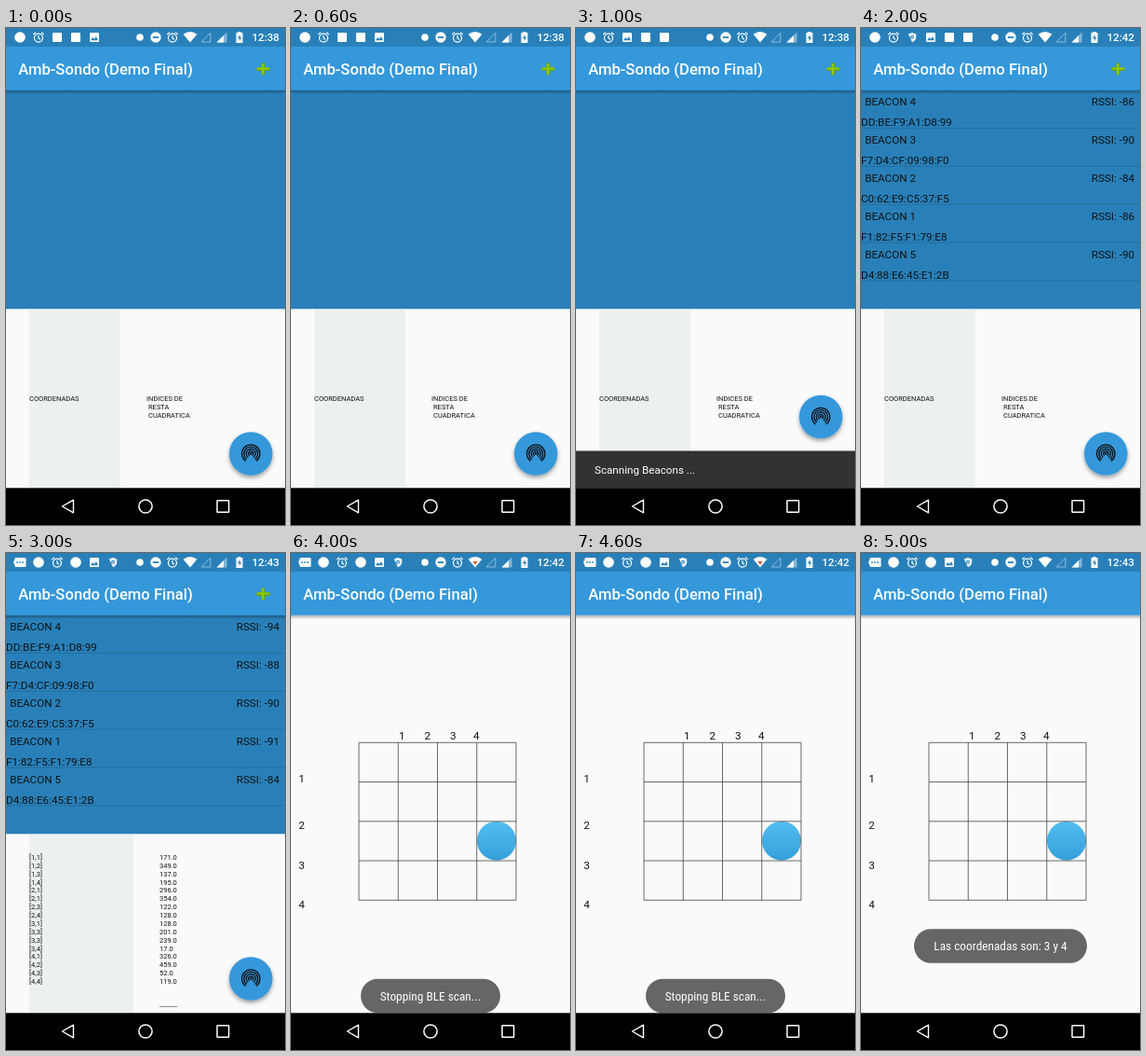
These frames come from a looping animation (300x533 px, 6 s). An HTML page:

```html
<!DOCTYPE html>
<html lang="es">
<head>
<meta charset="utf-8">
<title>Beacon demo</title>
<style>
  html, body { margin: 0; width: 100%; height: 100%; overflow: hidden; background: #fafafa; }
  svg { display: block; width: 100vw; height: 100vh; font-family: Roboto, sans-serif; }
  text { white-space: pre; }
  .toast { font-family: "Roboto Condensed", Roboto, sans-serif; font-stretch: 75%; }
</style>
</head>
<body>
<svg id="stage" viewBox="0 0 300 533">
  <defs>
    <linearGradient id="shade" x2="0" y2="1">
      <stop stop-color="#000" stop-opacity=".32"/>
      <stop offset="1" stop-color="#000" stop-opacity="0"/>
    </linearGradient>
    <linearGradient id="ball" x2="0" y2="1">
      <stop stop-color="#52bdf0"/>
      <stop offset="1" stop-color="#359fdb"/>
    </linearGradient>
    <filter id="drop" x="-30%" y="-30%" width="160%" height="170%">
      <feDropShadow dx="0" dy="2.5" stdDeviation="2.2" flood-opacity=".38"/>
    </filter>
  </defs>
  <g id="screen"></g>
</svg>
<script>
const BLUE = '#3498db', DARK = '#2980b9', PAPER = '#fafafa', INK = '#111';
const SIZE = 11.67, SMALL = 7.5, LEAD = 8.87;

const rect = (x, y, w, h, fill, more = '') =>
  `<rect x="${x}" y="${y}" width="${w}" height="${h}" fill="${fill}" ${more}/>`;
const disc = (x, y, r, fill, more = '') =>
  `<circle cx="${x}" cy="${y}" r="${r}" fill="${fill}" ${more}/>`;
const path = (d, fill, more = '') => `<path d="${d}" fill="${fill}" ${more}/>`;
const line = (d, stroke, w = 1) => path(d, 'none', `stroke="${stroke}" stroke-width="${w}"`);
const label = (x, y, s, size = SIZE, fill = INK, more = '') =>
  `<text x="${x}" y="${y}" font-size="${size}" fill="${fill}" ${more}>${s}</text>`;
const at = (x, y, body) => `<g transform="translate(${x} ${y})">${body}</g>`;

// Status icons, centred on the origin
const icons = {
  dot: disc(0, 0, 5.8, '#fff'),
  square: rect(-5, -5, 10, 10, '#fff', 'rx="1"'),
  alarm: disc(0, .6, 4.5, 'none', 'stroke="#fff" stroke-width="1.2"') +
    line('M0-2V1L2 2.3M-5.7-3L-3-5.4M5.7-3L3-5.4', '#fff', 1.2),
  image: rect(-5, -5, 10, 10, '#fff', 'rx="1.2"') + path('M-4 3.3L-1.6 0L0 2L2-1L4 3.3Z', DARK),
  shield: path('M0-5L4.2-3.4V0Q4 3.5 0 5.2Q-4-3.5-4.2-3.4V0Q-4 3.5 0 5.2Q-4 3.5-4.2 0V-3.4Z', '#fff') +
    disc(0, -.2, 2, DARK) + disc(0, -.2, .9, '#fff'),
  chat: path('M-5-5H5Q6.5-5 6.5-3.5V3.5Q6.5 5 5 5H-5L-7 0Z', '#fff') +
    [-3, 0, 3].map(x => disc(x, 0, .9, DARK)).join(''),
  quiet: disc(0, 0, 5.7, '#fff') + rect(-3.2, -.9, 6.4, 1.8, DARK),
  wifi: path('M0 5.6L-7.4-3.2Q0-8.6 7.4-3.2Z', '#fff'),
  wifiOff: path('M0 5.6L-7.4-3.2Q0-8.6 7.4-3.2Z', '#fff') + path('M-2.6-1H2.6L0 2.6Z', '#d9532c'),
  empty: path('M-4.8 5H4.8V-4.8Z', 'none', 'stroke="#8bbbdc" stroke-width="1"'),
  signal: path('M-5.5 5.5H5.5V-5.5Z', '#83b5d8') + path('M-5.5 5.5H2V-2Z', '#fff'),
  battery: path('M-1.5-6H1.5V-5H3.5V6H-3.5V-5H-1.5Z', '#fff') +
    path('M.8-3L-2 1H-.2V4L2.2 0H.5Z', DARK)
};

function statusBar(time, left, wifi = 'wifi') {
  const put = (name, x) => at(x, 10, icons[name]);
  return rect(0, 0, 300, 20, DARK) +
    left.split(' ').map((name, i) => put(name, 15 + i * 20)).join('') +
    disc(144, 10, 3.8, '#fff') +
    put('quiet', 161) + put('alarm', 179) + put(wifi, 198) +
    put('empty', 215) + put('signal', 232) + put('battery', 251) +
    label(294, 14.3, time, SIZE, '#fff', 'font-weight="500" text-anchor="end"');
}

const plus = path('M274.5 37.5H278.5V42H283.5V46H278.5V50.5H274.5V46H269.5V42H274.5Z', '#6f9f16') +
  path('M275 38H277.4V42.5H283V44.6H277.4V50H275V44.6H270V42.5H275Z', '#8ccb0c');

const toolbar = add => rect(0, 66.6, 300, 4.5, 'url(#shade)') + rect(0, 20, 300, 46.7, BLUE) +
  label(13.3, 50, 'Amb-Sondo (Demo Final)', 16.67, '#fff', 'font-weight="500"') + (add ? plus : '');

const navBar = rect(0, 493.3, 300, 40, '#000') +
  path('M60.5 513L72.5 506.2V519.8Z', 'none', 'stroke="#fff" stroke-width="1.4" stroke-linejoin="round"') +
  disc(150, 513, 7.1, 'none', 'stroke="#fff" stroke-width="1.5"') +
  rect(227, 506.7, 12.6, 12.6, 'none', 'stroke="#fff" stroke-width="1.5" rx=".6"');

// Arc of radius r, open towards the bottom
function arc(r) {
  const a = .62, x = r * Math.sin(a), y = r * Math.cos(a);
  return line(`M${-x} ${y}A${r} ${r} 0 1 1 ${x} ${y}`, INK, 1.35);
}
const fab = y => at(263.3, y, disc(0, 0, 23.3, BLUE, 'filter="url(#drop)"') +
  [2.6, 5, 7.4, 9.7].map(arc).join('') + disc(0, 0, 1.2, INK));

const column = w => rect(25, 302, w, 191.3, '#ecf0f1');
const headings = column(98) + label(25, 400, 'COORDENADAS', SMALL) +
  label(151, 400, 'INDICES DE', SMALL) + label(153, 409, 'RESTA', SMALL) +
  label(153, 417.7, 'CUADRATICA', SMALL);

const cells = '1,1 1,2 1,3 1,4 2,1 2,1 2,3 2,4 3,1 3,3 3,3 3,4 4,1 4,2 4,3 4,4'.split(' ');
const sums = [171, 349, 137, 195, 296, 354, 122, 128, 128, 201, 239, 17, 326, 459, 52, 119];
const results = column(112) + cells.map((c, i) =>
  label(25, 329 + i * LEAD, `[${c}]`, SMALL) +
  label(165, 329 + i * LEAD, sums[i].toFixed(1), SMALL)).join('') +
  rect(165, 486, 19, .8, '#777');

const beacons = [
  [4, 'DD:BE:F9:A1:D8:99'], [3, 'F7:D4:CF:09:98:F0'], [2, 'C0:62:E9:C5:37:F5'],
  [1, 'F1:82:F5:F1:79:E8'], [5, 'D4:88:E6:45:E1:2B']
];
const list = levels => beacons.map(([n, mac], i) => at(0, 66.7 + i * 40.9,
  rect(0, 40.2, 300, .8, '#000', 'opacity=".2"') +
  label(4.2, 16.5, 'BEACON ' + n) + label(294, 16.5, 'RSSI: ' + levels[i], SIZE, INK, 'text-anchor="end"') +
  label(0, 38.6, mac))).join('');

const scanner = (table, rows = '', fabY = 456.5) => rect(0, 66, 300, 235.5, DARK) + rows +
  rect(0, 301.5, 300, 192, PAPER) + table + fab(fabY);

const snackbar = rect(0, 453.5, 300, 40, '#323232') + label(20, 478, 'Scanning Beacons ...', SIZE, '#fff');

function gridPage() {
  const step = 42.25;
  let d = '';
  for (let i = 0; i < 5; i++) d += `M${73 + i * step} 203.3v169M73 ${203.3 + i * step}h169`;
  return rect(0, 66, 300, 428, PAPER) + disc(221, 308.7, 21, 'url(#ball)') + line(d, '#444', .8) +
    [116, 143.5, 171, 196].map((x, i) => label(x, 200, i + 1)).join('') +
    [245.7, 296, 339, 381].map((y, i) => label(8.3, y, i + 1)).join('');
}

const toast = (x, y, w, s) => rect(x, y, w, 36.6, '#666', 'rx="18.3"') +
  label(150, y + 23, s, 13.33, '#fff', 'class="toast" text-anchor="middle"');

const page = (status, body, add, top = '') => body + status + toolbar(add) + top + navBar;
const late = 'chat dot alarm dot image shield';
const scenes = [
  page(statusBar('12:38', 'dot alarm square square image'), scanner(headings), true),
  page(statusBar('12:38', 'dot alarm image square square'), scanner(headings, '', 417), true, snackbar),
  page(statusBar('12:42', 'dot alarm shield image square square'),
    scanner(headings, list([-86, -90, -84, -86, -90])), true),
  page(statusBar('12:43', late), scanner(results, list([-94, -88, -90, -91, -84])), true),
  page(statusBar('12:42', late, 'wifiOff'), gridPage(), false, toast(75, 456.7, 150, 'Stopping BLE scan...')),
  page(statusBar('12:43', late), gridPage(), false, toast(57, 403.2, 186, 'Las coordenadas son: 3 y 4'))
];

const screen = document.getElementById('screen');
let shown = -1;
function render(ms) {
  const i = Math.floor(ms / 1000) % scenes.length;
  if (i !== shown) screen.innerHTML = scenes[shown = i];
}

const start = performance.now();
function tick() {
  render(performance.now() - start);
  requestAnimationFrame(tick);
}
tick();
</script>
</body>
</html>
```
